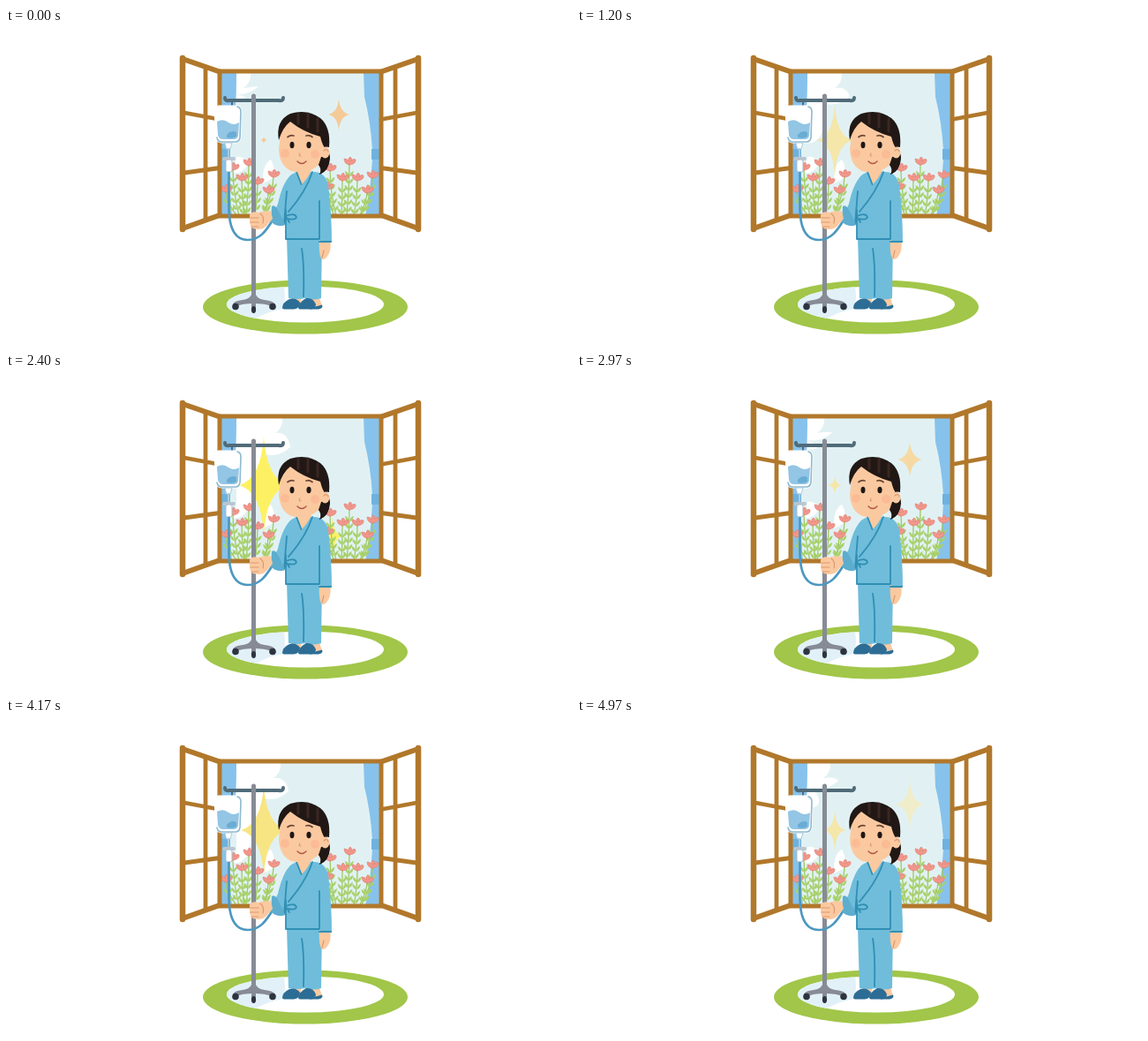
Animation of 640x359 px, one loop 5070 ms. Source, as an HTML page:

```html
<!DOCTYPE html>
<html lang="en">
<head>
<meta charset="utf-8">
<title>Patient at the window</title>
<style>
html, body { margin: 0; height: 100%; overflow: hidden; background: #fff; }
svg { display: block; width: 100vw; height: 100vh; }
path { stroke-linecap: round; stroke-linejoin: round; }
.wood { fill: none; stroke: #b1782b; }
.cloth { fill: #6fbddb; }
.seam { fill: none; stroke: #318fb4; stroke-width: 1.8; }
.skin { fill: #fbca a0; fill: #fbc9a0; }
.crease { fill: none; stroke: #d99a70; stroke-width: 1.2; }
.hair { fill: #211815; }
.pole { fill: none; stroke: #878b95; }
.steel { fill: none; stroke: #506b79; }
.shoe { fill: #2d6d95; }
</style>
</head>
<body>
<svg viewBox="0 0 640 359" preserveAspectRatio="none">
  <defs>
    <clipPath id="pane"><rect x="243" y="50" width="182" height="163"/></clipPath>
    <clipPath id="rugHole"><ellipse cx="339" cy="313" rx="89" ry="20.5"/></clipPath>
    <g id="shutter" class="wood">
      <path d="M200 34V228" stroke-width="6.5"/>
      <path d="M200 35L242 49.500M200 227L242 212" stroke-width="6"/>
      <path d="M226 45V216M202 96L242 103.500M202 164L242 158.500" stroke-width="4.800"/>
    </g>
  </defs>

  <!-- view -->
  <g clip-path="url(#pane)">
    <rect x="243" y="50" width="182" height="163" fill="#e1f1f3"/>
    <path id="cloud" fill="#fff"/>
    <path d="M261 146Q272 144 273 156Q266 166 258 164ZM291 176Q290 154 300 149Q306 160 303 170Z" fill="#fff"/>
    <g id="stars"></g>
    <path d="M243 50H261Q261 110 253 138V150Q253 180 256 213H243Z" fill="#87c2ec"/>
    <path d="M405 50H426V213H407Q413 185 415 148V138Q413 106 406 78Z" fill="#87c2ec"/>
    <path d="M414 137H426V149H414ZM243 137H254V149H243Z" fill="#6db2e0"/>
    <g id="flowers"></g>
  </g>

  <!-- window -->
  <path class="wood" d="M242 49H425V213H242Z" stroke-width="5"/>
  <use href="#shutter"/>
  <use href="#shutter" transform="translate(667) scale(-1 1)"/>

  <!-- rug -->
  <ellipse cx="339" cy="316" rx="116" ry="30.5" fill="#a1c649"/>
  <ellipse cx="339" cy="313" rx="89" ry="20.5" fill="#fff"/>
  <path clip-path="url(#rugHole)" d="M249 290H314Q318 304 314 318Q292 322 274 334H249Z" fill="#e2f1f8"/>

  <!-- drip stand -->
  <path class="pole" d="M280.5 78V317" stroke-width="5"/>
  <path d="M257 313Q258 309 268 308Q276 307 278 302H283Q285 307 293 308Q303 309 305 313L302 315Q292 312 283 312H278Q269 312 260 315Z" fill="#878b95"/>
  <g fill="#2d3440">
    <circle cx="260" cy="315.500" r="3.800"/><circle cx="302" cy="315.500" r="3.800"/>
    <ellipse cx="280.500" cy="319" rx="2.600" ry="4"/>
  </g>
  <path class="steel" d="M248 79Q248 83 253 82H309Q314 83 314 79" stroke-width="4"/>
  <path class="pole" d="M280.5 77V90" stroke-width="5"/>
  <path class="steel" d="M256 83V89" stroke-width="2"/>
  <path d="M241 89H262Q266 90 266 95L265 124Q264 129 260 129H244Q240 129 239 124L237 95Q237 90 241 89Z" fill="#fff" stroke="#fff" stroke-width="3"/>
  <path d="M262 89Q266 90 266 95L265 124Q264 129 260 129H244Q240 129 239 124" fill="none" stroke="#8fb9ce" stroke-width="1.600"/>
  <path d="M239 106Q246 102 252 107Q258 111 264 107L263 122Q262 126 258 126H246Q241 126 240 121Z" fill="#93c5e4"/>
  <path d="M250 121Q255 115 261 118V123Q256 126 250 124Z" fill="#69acd4"/>
  <path d="M248 130H256L254 137H250Z" fill="#fff" stroke="#a9cbdc"/>
  <path d="M252 137V149" fill="none" stroke="#a9cbdc" stroke-width="2"/>
  <path d="M247 148H258" fill="none" stroke="#b9c6d0" stroke-width="4"/>
  <rect x="249" y="149" width="7" height="14" rx="2" fill="#fff" stroke="#a5bac8"/>
  <path d="M252.500 164V205C253 229 260 240 274 240C287 240 294 231 303 216" fill="none" stroke="#4d98c0" stroke-width="2.700"/>

  <!-- legs -->
  <path class="skin" d="M323 300H334V312H323ZM344 300H355Q355 308 358 314L343 316Z"/>
  <path class="cloth" d="M318 236H358L357 306Q347 309 339 306Q329 308 320 306Z"/>
  <path class="seam" d="M335 250Q338 268 337 304"/>
  <g class="shoe">
    <path d="M344 317L358 313.500Q360 317 354 318.500H344Z"/>
    <path d="M313 317Q313 311 321 307Q329 305 333 311Q333 318 326 318.500H315Q313 318 313 317Z"/>
    <path d="M331 317Q332 310 340 306Q348 305 351 313Q351 318 345 318.500H333Q331 318 331 317Z"/>
  </g>

  <!-- coat -->
  <path class="skin" d="M355 240H367Q369 251 365 257Q361 264 357 261Q354 255 355 240Z"/>
  <path class="crease" d="M360 252L358 260"/>
  <path class="cloth" d="M322 167Q329 162 337 163H350Q362 164 365 178Q369 210 369 243H356V239H317L318 205L316 223Q306 226 300 219Q303 209 308 199Q313 176 322 167Z"/>
  <path class="skin" d="M329 161H346Q342 170 335 177Z"/>
  <path class="seam" d="M317 206V239H355V196M355 242H368M318 185L315 222M347 163Q340 185 320 208M329 163L334.500 177"/>
  <path class="seam" d="M317 213Q327 209 329 214Q328 218 318 216M317 214L321 220"/>
  <path d="M301 202Q305 199 309 208Q314 217 316 223Q307 226 300 219Z" fill="#5dadcf"/>
  <path class="skin" d="M276 211Q279 207 286 209Q293 206 296 208L300 207L302 216L295 224Q290 230 280 227Q276 225 276 218Z"/>
  <path class="crease" d="M277 215H286M277 220H286M278 225H286M288 210Q293 214 291 221"/>

  <!-- head -->
  <path class="hair" d="M352 126Q367 134 367 148Q366 162 355 166Q359 160 352 152Z"/>
  <path class="skin" d="M311 118Q318 102 337 103Q358 106 360 130Q361 149 352 157Q340 166 323 162Q310 156 309 138Z"/>
  <path class="hair" d="M357 146Q365 144 366 151Q363 162 355 166Q359 160 354 155Z"/>
  <ellipse class="skin" cx="361.500" cy="141" rx="5" ry="6.500"/>
  <path class="crease" d="M360 139Q364 136 365 140"/>
  <path class="hair" d="M309 127Q305 105 322 97Q341 91 356 102Q368 112 366 135L360 134Q358 131 356 123Q337 118 322 106Q313 113 309 127Z"/>
  <path d="M331 98V108M342 97V112M353 103V117" fill="none" stroke="#3b2721" stroke-width="3"/>
  <g fill="#fab08d" opacity=".55"><circle cx="316" cy="142" r="5"/><circle cx="350" cy="143" r="5"/></g>
  <g class="hair"><ellipse cx="324" cy="132.500" rx="2.500" ry="3.700"/><ellipse cx="343" cy="132.500" rx="2.600" ry="3.700"/></g>
  <path d="M319 123.500Q322 121 326 122M340 122Q344 121 347 123.500" fill="none" stroke="#6b4634" stroke-width="1.800"/>
  <path class="crease" d="M333 142Q331 145 334 145"/>
  <path d="M330 151Q335 156 340 151" fill="none" stroke="#b0574a" stroke-width="1.500"/>
</svg>
<script>
const LOOP = 5070, CYCLE = 12;
const $ = id => document.getElementById(id);

function add(parent, tag, attrs) {
  const el = document.createElementNS('http://www.w3.org/2000/svg', tag);
  for (const name in attrs) el.setAttribute(name, attrs[name]);
  return parent.appendChild(el);
}

// Flower heads: x, y, foot of the stem
const blooms = [
  [275, 153, 272], [257, 158, 264], [303, 166, 290], [267, 170, 270],
  [297, 184, 292], [249, 183, 262], [285, 174, 282], [367, 159, 374],
  [389, 152, 386], [381, 170, 380], [398, 170, 394], [415, 167, 402],
  [409, 184, 400], [364, 180, 372]
];

function flower([x, y, foot]) {
  const g = $('flowers'), mid = (y + 212) / 2;
  add(g, 'path', { d: `M${x} ${y}Q${x} ${mid} ${foot} 213`, fill: 'none', stroke: '#9fca60', 'stroke-width': 1.3 });
  for (let ly = y + 12; ly < 207; ly += 8) {
    const s = (ly - y) / (212 - y), lx = x + (foot - x) * s * s;
    for (const side of [-1, 1]) {
      add(g, 'path', { d: `M${lx} ${ly + 4}q${side * 4} 0 ${side * 5} -6q${-side * 4} 1 ${-side * 5} 6`, fill: '#a9d16c' });
    }
  }
  add(g, 'path', {
    d: `M${x} ${y + 3}q-6 -1 -6 -7q4 0 5 3q-1 -4 2 -5q3 2 1 5q2 -4 5 -2q1 5 -7 6Z`,
    fill: '#f0978a', stroke: '#e27c73', 'stroke-width': .6
  });
}
blooms.forEach(flower);

// Poses by step: half width, half height, waist, colour
const thin = .03, full = .12;
const pale = '#f5e6a9', gold = '#f7e584', lemon = '#fdf163', peach = '#f4cb98';
const sparkles = [
  { x: 292, y: 127, pose: {
    0: [4, 4, full, peach], 1: [8, 10, .08, pale], 2: [14, 25, thin, pale],
    3: [21, 42, .08, pale], 4: [26, 51, full, gold], 5: [28, 54, full, gold],
    6: [28, 55, full, lemon], 7: [16, 29, full, gold], 8: [9, 15, full, peach],
    9: [8, 13, full, peach], 10: [7, 10, full, peach], 11: [5, 7, full, peach] } },
  { x: 377, y: 98, pose: {
    0: [12, 18, full, peach], 1: [14, 20, full, '#f6d9a2'], 2: [19, 33, .01, '#f0edcb'],
    9: [10, 20, thin, pale], 10: [18, 32, full, gold], 11: [15, 25, full, '#f8da98'] } },
  { x: 370, y: 185, pose: {
    5: [6, 12, full, gold], 6: [10, 21, full, lemon], 7: [6, 11, full, gold] } }
];
for (const s of sparkles) s.el = add($('stars'), 'path', { transform: `translate(${s.x} ${s.y})` });
const halo = add($('stars'), 'path', {
  transform: 'translate(292 127)', fill: 'none', stroke: '#f3e3a0',
  'stroke-width': 1.5, 'stroke-dasharray': '4 5'
});

function star(w, h, waist) {
  const a = w * waist, b = h * waist;
  return `M0 ${-h}Q${a} ${-b} ${w} 0Q${a} ${b} 0 ${h}Q${-a} ${b} ${-w} 0Q${-a} ${-b} 0 ${-h}Z`;
}

const cloudEdge = [277, 280, 287, 300, 311, 313, 313, 308, 303, 299, 292, 284];

// The cloud hangs lower at the left as it grows
function cloud(edge) {
  const grow = edge - 277, low = 66 + grow * .5, foot = 80 + grow * 2.2;
  return `M261 50H${edge}Q${edge + 1} 62 ${edge - 8} 68Q${edge + 6} 66 ${edge + 9} ${low}` +
    `Q${edge - 4} ${low + 12} ${edge - 20} ${low + 8}Q284 ${foot} 261 ${foot}Z`;
}

function draw(step) {
  for (const { el, pose } of sparkles) {
    const p = pose[step];
    el.setAttribute('d', p ? star(p[0], p[1], p[2]) : '');
    if (p) el.setAttribute('fill', p[3]);
  }
  const ring = { 7: [17, 38], 8: [18, 35], 9: [19, 30] }[step];
  halo.setAttribute('d', ring ? star(...ring, .5) : '');
  $('cloud').setAttribute('d', cloud(cloudEdge[step]));
}

// 12.5 poses a second, shown on a 30 per second clock
function tick() {
  const beat = Math.floor((performance.now() % LOOP) * .03 + .05);
  draw(Math.floor(beat / 2.4 + .001) % CYCLE);
  requestAnimationFrame(tick);
}
tick();
</script>
</body>
</html>
```
